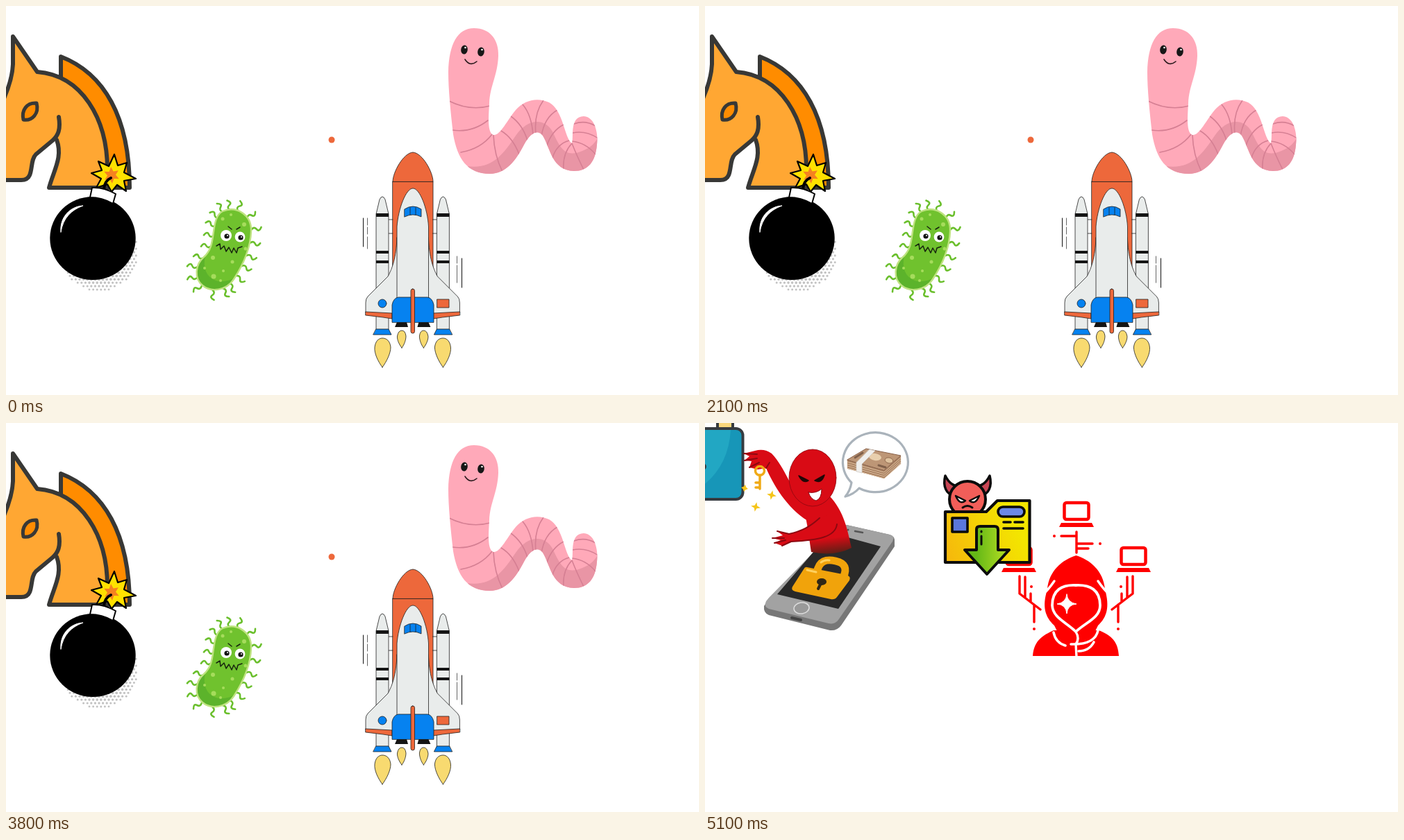
Recreate the animation shown at these times as an HTML page with a canvas. Size 998x561 px, loop 8 s.

```html
<!DOCTYPE html>
<html lang="en">
<head>
<meta charset="utf-8">
<title>Threats</title>
<style>
html, body { margin: 0; width: 100%; height: 100%; overflow: hidden; background: #fff; }
canvas { display: block; }
</style>
</head>
<body>
<canvas id="stage" width="998" height="561"></canvas>
<script>
const ctx = document.getElementById('stage').getContext('2d');
const LOOP = 8000, SWITCH = 5100, TICK = 100, BOMB_STEP = 170;
const TAU = Math.PI * 2;

function draw(d, fill, stroke, width = 1) {
  const path = typeof d === 'string' ? new Path2D(d) : d;
  if (fill) { ctx.fillStyle = fill; ctx.fill(path); }
  if (stroke) { ctx.strokeStyle = stroke; ctx.lineWidth = width; ctx.stroke(path); }
}
const line = (d, color, width) => draw(d, null, color, width);

function oval(x, y, rx, ry, fill, stroke, width, turn = 0) {
  const p = new Path2D();
  p.ellipse(x, y, rx, ry, turn, 0, TAU);
  draw(p, fill, stroke, width);
}
const dot = (x, y, r, fill, stroke, width) => oval(x, y, r, r, fill, stroke, width);

function box(x, y, w, h, r, fill, stroke, width) {
  const p = new Path2D();
  p.roundRect(x, y, w, h, r);
  draw(p, fill, stroke, width);
}

function star(x, y, outer, inner, points, turn, fill, stroke, width) {
  const p = new Path2D();
  for (let i = 0; i < points * 2; i++) {
    const r = i % 2 ? inner : outer, a = turn + i * Math.PI / points;
    p.lineTo(x + r * Math.cos(a), y + r * Math.sin(a));
  }
  p.closePath();
  draw(p, fill, stroke, width);
}

function shifted(x, y, turn, paint) {
  ctx.save();
  ctx.translate(x, y);
  ctx.rotate(turn);
  paint();
  ctx.restore();
}

// Paints once as given and once reflected about the vertical line at axis.
function mirrored(axis, paint) {
  paint();
  ctx.save();
  ctx.translate(axis * 2, 0);
  ctx.scale(-1, 1);
  paint();
  ctx.restore();
}

function gradient(x0, y0, x1, y1, from, to) {
  const g = ctx.createLinearGradient(x0, y0, x1, y1);
  g.addColorStop(0, from);
  g.addColorStop(1, to);
  return g;
}

function horse() {
  const ink = '#383836';
  draw('M79 73C141 97 178 160 178 262H100V130H79Z', '#ff8c00');
  draw('M10 44L45 95C109 100 146 162 146 236V262H62C70 235 82 220 73 192L41 216C36 222 38 235 34 244Q31 251 22 251H-6V128Q10 110 10 84Z', '#ffa733');
  line('M79 103V73C141 97 178 160 178 262H62C69 236 82 218 73 193', ink, 6);
  line('M-6 140Q9 108 10 84V44L45 95C109 100 146 162 146 236V262', ink, 6);
  line('M76 160C79 178 75 187 67 194L43 214C36 221 38 235 34 244Q31 251 22 251H-6', ink, 6);
  draw('M44 140C48 155 38 166 25 164C22 150 30 139 44 140Z', '#ff8c00', ink, 5);
}

function halftone(x, y, radius, turn, size) {
  shifted(x, y, turn, () => {
    for (let row = -11; row <= 11; row++) {
      for (let col = -11; col <= 11; col++) {
        const px = col * 5.6 + (row & 1) * 2.8, py = row * 4.9;
        const far = Math.hypot(px, py) / radius;
        if (far < 1) dot(px, py, size * (1.15 - far * far * .5), '#c2c2c2');
      }
    }
  });
}

function bomb(small) {
  if (small) halftone(132, 357, 55, -.2, 2.1);
  else halftone(134, 355, 56, 0, 2.2);

  if (small) {
    star(152, 242, 22, 13, 9, -1.6, '#ffe100', '#000', 2);
    star(152, 243, 8, 4, 6, .2, '#f58220');
  } else {
    draw('M156 214L161 230L174 226L170 240L187 249L170 252L173 267L160 258L152 268L146 257L130 262L137 249L123 241L138 237L133 224L148 231Z', '#ffe100', '#000', 2.2);
    star(152, 244, 12, 6, 6, -.6, '#f58220');
  }
  line('M141 264Q142 252 151 248', '#000', 4);
  if (small) oval(125.7, 335.5, 59.8, 61.5, '#000');
  else oval(125, 335, 61.7, 60, '#000');
  draw('M124 262Q141 261 158 271L154 285Q138 276 121 276Z', '#fff', '#000', 2);
  draw('M79 326C77 305 92 289 111 288C94 294 82 306 79 326Z', '#fff', '#fff', 1);
}

function microbe() {
  const body = new Path2D('M312 296C331 288 354 300 353 325C352 350 341 374 328 394C317 411 295 413 283 403C271 393 272 373 285 362C298 350 297 335 300 319C302 306 306 299 312 296Z');
  // Root x, root y and direction in degrees of each hair.
  const hairs = [[334, 296, -70], [323, 295, -100], [313, 297, -120], [347, 306, -30], [353, 323, -8],
    [351, 342, 8], [346, 360, 20], [339, 375, 25], [331, 389, 40], [322, 400, 65], [312, 407, 60],
    [297, 409, 88], [282, 403, 150], [276, 391, 175], [276, 376, 190], [285, 363, 195],
    [296, 346, 185], [300, 331, 190], [302, 317, 205], [307, 305, 215]];
  for (const [x, y, deg] of hairs) {
    shifted(x, y, deg * TAU / 360, () => line('M0 0q5-5 8 0t7-2', '#6abf2c', 2.6));
  }
  draw(body, '#70c22e');
  ctx.save();
  ctx.clip(body);
  draw('M288 358C278 388 303 408 331 391L320 420H265V362Z', '#5cb32b');
  ctx.restore();
  line(body, '#bfe381', 2.4);
  [[298, 363, 3], [299, 390, 3.5], [313, 382, 2], [326, 369, 2.5], [312, 307, 2.5], [324, 301, 2],
    [343, 315, 3], [345, 350, 2.5], [286, 378, 2], [309, 396, 2]].forEach(([x, y, r]) => dot(x, y, r, '#a6dc5c'));
  for (const [x, y, r] of [[317, 331, 8], [337, 333, 7.4]]) {
    dot(x, y, r, '#fff');
    dot(x + 1, y + 1, 3.6, '#111');
    dot(x + 2, y, 1, '#fff');
  }
  line('M320 318L325 322M332 322L337 319M303 346L308 343L309 351L314 346L317 354L321 348L325 356L328 349L332 356L334 349L340 347', '#17250e', 1.5);
}

function worm() {
  const body = new Path2D('M674 32C698 32 710 50 709 72C708 100 697 115 696 140C695 160 693 183 702 186C712 187 722 164 734 150C746 136 765 131 782 139C803 150 804 191 815 198C818 188 811 160 832 159C850 160 853 188 851 200C849 225 838 238 818 238C786 237 784 205 773 187C766 178 756 182 746 200C735 222 720 242 697 242C664 242 650 220 644 185C640 150 637 120 637 95C638 55 650 32 674 32Z');
  draw(body, '#ffa9b9');
  ctx.save();
  ctx.clip(body);
  draw('M664 231C700 236 716 214 734 187C750 163 775 160 787 181C799 207 806 219 830 209C845 203 850 195 854 186L860 250H660Z', '#e995a5');
  line('M638 137Q668 152 697 144M643 179Q671 183 694 165M655 211Q684 206 700 185M702 186Q703 215 715 239M713 180Q730 190 739 214M727 159Q744 171 751 194M744 142Q757 157 759 186M774 136Q760 155 763 184M794 150Q775 161 771 188M803 171Q786 180 779 201M811 194Q793 199 787 219M815 198Q801 213 803 237M815 198Q822 216 832 236M815 195Q835 197 849 214M816 183Q835 179 853 191M818 170Q834 164 849 173', '#d57f93', 1.6);
  ctx.restore();
  oval(660, 63, 4.8, 6.6, '#171717', null, 0, .12);
  oval(684, 66, 4.8, 6.6, '#171717', null, 0, .12);
  dot(661.5, 60, 1.3, '#fff');
  dot(685.5, 63, 1.3, '#fff');
  line('M661 77Q668 88 678 80', '#2b1a1d', 1.6);
}

function rocket() {
  const ink = '#202020', pale = '#e9eceb', orange = '#ed683b', blue = '#0682f0', flame = '#f8da70';
  const axis = 585.7;
  const part = (d, fill) => draw(d, fill, ink, .8);
  part('M557 253H615V420H557Z', orange);
  part('M557 253C557 240 572 212 586 211C600 212 615 240 615 253Z', orange);
  mirrored(axis, () => {
    line('M551 308H557M551 328H557', ink, .8);
    part('M533 466V300L538 279Q542 271 546 279L551 300V466Z', pale);
    for (const [y, h] of [[299, 5], [353, 4], [367, 4]]) box(533, y, 18, h, 0, '#151515');
    part('M533 466H551L555 474H529Z', blue);
    part('M563 334C562 363 556 379 550 390L521 419Q518 422 518 428V442L558 447H566Z', pale);
    part('M518 441L556 443V451L543 449L518 446Z', orange);
    draw('M563 456H577L579 463H560Z', '#151515');
    part('M542 521C536 513 530 501 531 492C532 483 537 479 542 479C548 479 553 483 554 492C554 501 548 513 542 521Z', flame);
    part('M570 493C566 488 563 481 563.5 476Q565 468 570 468Q575 468 576 476C576 481 574 488 570 493Z', flame);
  });
  part('M563 440V318C565 292 576 263 586 263C596 263 607 292 608.5 318V440Z', pale);
  part('M574 293Q586 285 598 293V304Q586 298 574 304Z', blue);
  line('M582 291V301M590 291V301', ink, .8);
  part('M556 456V431Q558 421 565 420H607Q614 421 616 431V456Z', blue);
  box(583, 408, 5.5, 64, 2.7, orange, ink, .8);
  dot(542, 429, 6, blue, ink, .8);
  box(621, 423, 17, 12, 0, orange, ink, .8);
  line('M514.5 306V347M656.5 364V406', '#111', 1);
  line('M520.5 306V316M520.5 319V329M520.5 333V350M649.5 361V371M649.5 374V399', '#555', .9);
}

function phone() {
  draw('M92 254L190 153Q196 146 204 147L266 161Q274 163 273 172V178L196 292Q190 300 180 299L92 277Q84 274 85 264Z', '#777');
  draw('M92 252L190 152Q196 145 204 147L266 161Q274 163 270 171L192 284Q187 291 178 289L92 268Q84 265 88 257Z', '#a2a2a2');
  draw('M104 247L180 158L253 178L192 268Z', '#292929');
  oval(139, 267, 11, 8, '#999', '#ddd', 1.5, -.15);
  line('M216 156L227 158', '#555', 2.5);
  line('M125 281L138 284', '#444', 4);
  dot(206, 154, 1.5, '#555');

  const gold = '#f1a30b';
  line('M161 216C164 198 175 196 188 199C202 202 205 210 199 223', gold, 11);
  draw('M147 208L203 219Q211 221 208 227L190 251Q187 255 181 254L130 243Q123 241 126 236L142 211Q144 207 147 208Z', gold);
  line('M147 212L160 215M167 201Q172 197 179 198', '#ffd15e', 3);
  oval(168, 229, 7, 5, '#302716');
  line('M168 229L163 239', '#302716', 4);
}

function redFigure() {
  const red = '#d90b15', dark = '#8b0810';
  draw('M138 104H178C202 128 206 160 211 180Q186 193 153 186C149 160 147 140 138 104Z', gradient(178, 166, 181, 190, red, '#552015'));
  draw('M143 112C123 96 116 65 96 44Q85 36 72 40L56 44L64 48L57 54L67 55L64 64L76 67L88 65C98 88 118 123 148 141Z', red);
  line('M56 44L75 45M57 54L75 51M64 64L78 57M88 65L93 57', dark, 2);
  oval(155, 79, 34, 41, red, dark, .8);
  draw('M190 128C207 145 193 165 165 169L124 171L111 177L100 173L109 169L97 166L112 162L104 156L121 160C142 156 150 149 165 137Z', red);
  line('M165 137C151 150 139 156 121 160L104 156M190 146C188 164 164 169 124 171L111 177M97 166L114 166M100 173L116 169', dark, 2);
  draw('M135 76L149 83Q141 88 135 76ZM172 75L158 83Q168 88 172 75Z', '#210707', '#210707', 1.5);
  draw('M149 100Q160 102 168 95Q168 109 160 112Q152 110 149 100Z', '#fff', dark, 1);

  const gold = '#f0aa16';
  dot(79, 69, 6.5, null, gold, 3.5);
  line('M79 75V95M79 86H73M79 93H73', gold, 3.5);
  for (const [x, y, r] of [[96, 104, 7], [73, 121, 7], [57, 94, 5]]) star(x, y, r, 2.6, 4, .2, '#f5c51b');
}

function moneyBubble() {
  draw('M222 94Q214 103 202 106Q209 98 211 86A47 43 0 1 1 222 94Z', '#fff', '#aab3bb', 3.2);
  draw('M205 53L258 68L282 47V58L258 80L205 66Z', '#a98162');
  draw('M205 53L232 37L282 47L258 68Z', '#bd9676', '#886048', 1);
  for (let y = 3; y < 13; y += 3) line(`M205 ${53 + y}L258 ${68 + y}L282 ${47 + y}`, '#dec0a0', 1);
  oval(245, 49, 9, 5, '#e8cfad', null, 0, .15);
  oval(265, 54, 6, 4, '#dec19d', '#8e694e', 1, .2);
  line('M216 50L227 43M250 61L260 64', '#80604a', 3);
  draw('M237 38L245 40L226 59V72L218 70V57Z', '#f0efed', '#d2cfca', .8);
}

function briefcase() {
  const ink = '#363b40';
  box(18, -10, 22, 22, 2, '#f9d77c', ink, 4);
  box(-60, 8, 114.5, 102, 10, '#1796b8', ink, 4);
  draw('M-4 10H37Q34 62 -4 91Z', '#22a7c3');
  dot(-3, 63, 5, ink);
}

function folder() {
  const ink = '#0b0b0b';
  mirrored(378, () => draw('M346 76C342 92 348 103 358 104L368 92C357 91 351 86 346 76Z', '#c84554', ink, 3.5));
  dot(378, 110, 26, '#f15e59', ink, 4);
  mirrored(378, () => draw('M361 105L375 112Q367 119 361 105Z', '#fff', ink, 2.5));
  line('M371 122Q378 117 385 122', ink, 3);
  draw('M346 128H405L421 112H467.5V201H346Z', gradient(346, 190, 445, 140, '#f6b80c', '#f3e600'), ink, 4.2);
  box(356, 137, 22, 20, 0, '#5b77dc', ink, 3.6);
  box(422, 121, 38, 14, 7, '#6c89e5', ink, 3.6);
  line('M430 143H440M446 143H458M430 152H458', ink, 3.6);
  draw('M391 183V153Q391 149 396 149H417Q422 149 422 154V183H438L406 218L374 183Z', gradient(391, 0, 425, 0, '#65b817', '#a3d620'), ink, 4);
  line('M398 175V163M398 157V156', ink, 3);
}

function intruder() {
  const red = '#f00', axis = 534.5;
  const laptop = (x, y) => {
    box(x - 17.5, y, 35, 24, 3, '#fff', red, 4.5);
    draw(`M${x - 22} ${y + 29}h44l3 6h-50Z`, red);
  };
  laptop(535, 115);
  line('M535 157V187M513 163H535M535 174H558M535 181H552', red, 3.4);
  dot(503, 163, 2, red);
  dot(569, 174, 2, red);
  mirrored(axis, () => {
    laptop(452, 180);
    line('M453 221V246L483 269M461 222V251M469 246V258M474 262V287', red, 3.4);
    dot(470, 236, 2, red);
    dot(474, 297, 2, red);
  });

  draw('M472 336C474 312 488 306 502 299H567C585 306 595 315 596 336Z', red);
  draw('M534.5 191C515 197 495 213 493 240C485 265 490 280 503 292L516 318H553L566 292C579 280 583 265 576 240C574 213 554 197 534.5 191Z', red);
  line('M534 234C514 233 500 241 500 263C501 281 520 287 534 301C549 287 569 281 569 263C569 241 555 233 534 234Z', '#fff', 3.8);
  line('M491 243Q496 238 503 228M578 243Q573 238 566 228M534 301Q540 311 534 319L535 337', '#fff', 3.4);
  line('M502 302Q505 317 519 321M566 299Q562 320 527 319M560 316Q553 329 538 329', '#fff', 3.6);
  draw('M521 247Q522 259 535 261Q522 262 521 275Q520 262 507 261Q520 259 521 247Z', '#fff', '#fff', 1);
}

function render(time) {
  const now = Math.floor(time % LOOP / TICK) * TICK;
  ctx.fillStyle = '#fff';
  ctx.fillRect(0, 0, 998, 561);
  ctx.lineJoin = ctx.lineCap = 'round';
  if (now < SWITCH) {
    horse();
    bomb(Math.floor(now / BOMB_STEP) % 2 === 1);
    microbe();
    worm();
    dot(469, 193, 4.5, '#ed683b');
    rocket();
  } else {
    briefcase();
    phone();
    redFigure();
    moneyBubble();
    intruder();
    folder();
  }
}

const start = performance.now();
function frame() {
  render(performance.now() - start);
  requestAnimationFrame(frame);
}
frame();
</script>
</body>
</html>
```
